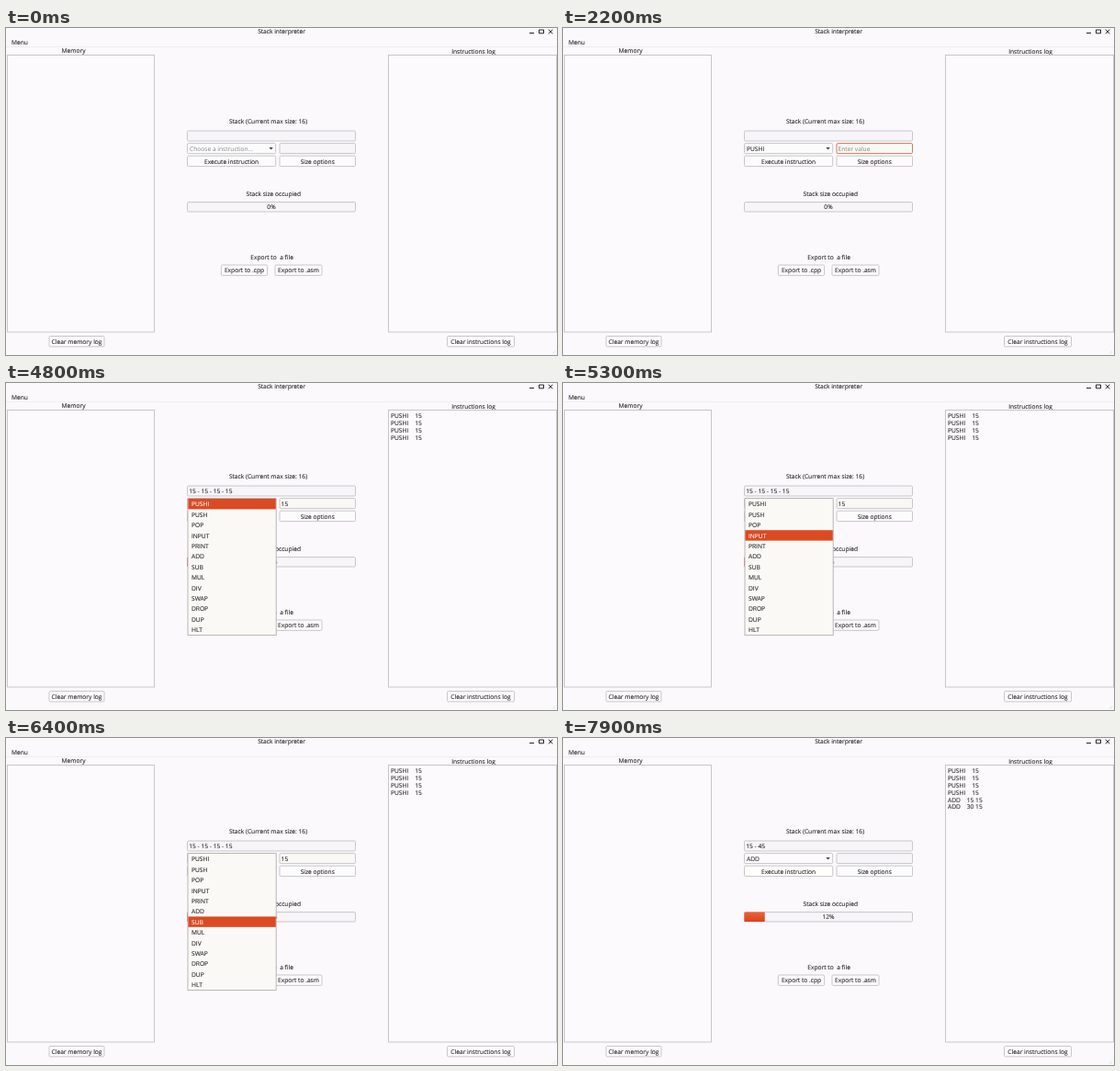
An HTML page that plays this animation: 600x356 px, repeating every 8000 ms.

```html
<!DOCTYPE html>
<html lang="en">
<head>
<meta charset="utf-8">
<title>Stack interpreter</title>
<style>
  html, body { margin: 0; width: 100%; height: 100%; overflow: hidden; background: #fbf9fc; }
  svg { display: block; width: 600px; height: 356px; }
  text {
    font: 6.65px "Open Sans", "Noto Sans", sans-serif;
    fill: #262426; stroke: #262426; stroke-width: .1px;
    text-rendering: geometricPrecision; white-space: pre;
  }
  .mid { text-anchor: middle; }
  .hint { fill: #858386; stroke: none; }
  .lit { fill: #fff; stroke: #fff; }
  .box { fill: #fcfafd; stroke: #c3c1c4; stroke-width: .9px; }
  .field { fill: #f7f5f8; }
  .field.on { fill: #faf8f4; }
  .field.focus { stroke: #cf6a48; }
  .button { fill: #fdfcfd; }
  .hover { fill: #fffffc; }
  .list { fill: #fbf9f6; stroke: #b3b0ae; }
  .mark { fill: none; stroke: #262426; stroke-width: 1px; }
</style>
</head>
<body>
<svg id="stage" viewBox="0 0 600 356">
  <defs>
    <linearGradient id="heat" x2="0" y2="1">
      <stop offset="0" stop-color="#ee6139"/>
      <stop offset="1" stop-color="#d8431d"/>
    </linearGradient>
  </defs>
</svg>
<script>
const stage = document.getElementById('stage');
const LOOP = 8000;
const CODES = 'PUSHI PUSH POP INPUT PRINT ADD SUB MUL DIV SWAP DROP DUP HLT'.split(' ');
const ROW = 11.4;
const GAP = '\u00a0'.repeat(4);

function add(tag, attrs, parent = stage) {
  const el = document.createElementNS('http://www.w3.org/2000/svg', tag);
  for (const key in attrs) el.setAttribute(key, attrs[key]);
  return parent.appendChild(el);
}

function box(x, y, right, bottom, cls = '', parent = stage, rx = 1.2) {
  return add('rect', { x, y, width: right - x, height: bottom - y, rx, class: 'box ' + cls }, parent);
}

// y is the middle of the capitals
function label(str, x, y, cls = '', parent = stage) {
  const el = add('text', { x, y: y + 2.4, class: cls }, parent);
  el.textContent = str;
  return el;
}

function button(str, x, y, right) {
  const el = box(x, y, right, y + 11.4, 'button');
  label(str, (x + right) / 2, y + 5.9, 'mid');
  return el;
}

const show = (el, on) => el.setAttribute('visibility', on ? 'visible' : 'hidden');
const write = (el, str) => { if (el.textContent !== str) el.textContent = str; };

// window frame
label('Stack interpreter', 300, 3.6, 'mid');
add('path', { d: 'M570 5.5h5M580.5 2h5v3.8h-5zM590.7 1.6l4.6 4.6m0-4.6l-4.6 4.6', class: 'mark' });
label('Menu', 6, 15.5);
add('path', { d: 'M0 20.5H600', stroke: '#f0eef1' });
add('path', { d: 'M595 354.5l3-3m-1 3l1-1', stroke: '#cfcdd0', 'stroke-width': .6 });

// side panels
label('Memory', 73.5, 25, 'mid');
box(1.5, 29.5, 161.5, 331, '', stage, 0);
button('Clear memory log', 47, 335.5, 107);
label('Instructions log', 509, 25.5, 'mid');
box(416.5, 29.5, 599.6, 331, '', stage, 0);
button('Clear instructions log', 480.5, 335.5, 553.5);
const logRows = Array.from({ length: 6 }, (_, i) => label('', 419, 36 + i * 7.8));

// centre column
label('Stack (Current max size: 16)', 285.5, 102, 'mid');
box(197.5, 112, 380.5, 123, 'field');
const stackText = label('', 199.3, 117.7);

box(197.5, 125.6, 293.7, 136.6, 'button');
const choice = label('', 200, 131.2);
add('path', { d: 'M286.4 130h4.4l-2.2 2.5z', fill: '#444' });

const field = box(298, 125.6, 380.5, 136.6, 'field');
const fieldText = label('', 299.6, 131.2);
const caret = add('path', { stroke: '#262426', 'stroke-width': .7 });

const execute = button('Execute instruction', 197.5, 139.2, 293.7);
button('Size options', 298, 139.2, 380.5);

label('Stack size occupied', 291.3, 181, 'mid');
box(197.5, 189.6, 380.5, 200, 'field');
const bar = add('rect', { x: 197.4, y: 189.5, height: 10.6, rx: 1.2, fill: 'url(#heat)' });
const percent = label('', 289, 195, 'mid');

label('Export to\u00a0 a file', 289.6, 249.3, 'mid');
button('Export to .cpp', 234.4, 258, 284.6);
button('Export to .asm', 293, 258, 344);

// drop-down list
const popup = add('g');
box(198, 125.6, 294.2, 274.6, 'list', popup, 0);
const glow = add('rect', { x: 198.4, width: 95.4, height: ROW, fill: '#dc4a22' }, popup);
const items = CODES.map((code, i) => label(code, 202, 132 + i * ROW, '', popup));

// [time, value]: each value holds until the next one
const HOVER = [
  [0, null], [500, ''], [600, 'PUSH'], [800, 'PUSHI'], [1200, null],
  [4800, 'PUSHI'], [5000, 'PUSH'], [5100, 'POP'], [5300, 'INPUT'], [5500, 'PRINT'],
  [5700, 'INPUT'], [6100, 'POP'], [6300, 'PRINT'], [6400, 'SUB'], [6500, 'MUL'],
  [6600, 'SUB'], [6900, 'ADD'], [7200, null]
];
const CHOICE = [[0, ''], [1200, 'PUSHI'], [7200, 'ADD']];
const INPUT = [[0, ''], [1200, 'Enter value'], [2400, '15'], [7200, '']];
const RUNS = [
  [3400, 'PUSHI'], [3600, 'PUSHI'], [3700, 'PUSHI'], [3900, 'PUSHI'],
  [7700, 'ADD'], [7900, 'ADD']
];

const at = (track, t) => track.filter(([start]) => start <= t).pop()[1];
const within = (t, from, to) => t >= from && t < to;

function run(t) {
  const stack = [], log = [];
  for (const [start, code] of RUNS) {
    if (start > t) break;
    if (code === 'PUSHI') {
      stack.push(15);
      log.push(code + GAP + 15);
    } else {
      const a = stack.pop(), b = stack.pop();
      stack.push(a + b);
      log.push(code + GAP + a + ' ' + b);
    }
  }
  return { stack, log };
}

function draw(t) {
  const { stack, log } = run(t);
  logRows.forEach((row, i) => write(row, log[i] || ''));
  write(stackText, stack.join(' - '));
  const used = Math.floor(stack.length / 16 * 100);
  write(percent, used + '%');
  bar.setAttribute('width', used ? 183 * used / 100 + .4 : 0);

  const code = at(CHOICE, t);
  write(choice, code || 'Choose a instruction...');
  choice.setAttribute('class', code ? '' : 'hint');

  const typed = t >= 2400;
  write(fieldText, at(INPUT, t));
  fieldText.setAttribute('class', typed ? '' : 'hint');
  field.setAttribute('class', 'box field' +
    (within(t, 1200, 7200) ? ' on' : '') + (within(t, 1600, 3400) ? ' focus' : ''));
  caret.setAttribute('d', `M${typed ? 307.3 : 299.5} 127.2v7.8`);
  show(caret, within(t, 1600, 2200) || within(t, 2400, 3200));
  execute.setAttribute('class', 'box button' +
    (within(t, 3400, 4800) || t >= 7700 ? ' hover' : ''));

  const hover = at(HOVER, t);
  const row = CODES.indexOf(hover);
  popup.setAttribute('display', hover === null ? 'none' : 'inline');
  glow.setAttribute('y', 126 + row * ROW);
  glow.setAttribute('display', row < 0 ? 'none' : 'inline');
  items.forEach((item, i) => item.setAttribute('class', i === row ? 'lit' : ''));
}

const begin = performance.now();
function tick() {
  draw((performance.now() - begin) % LOOP);
  requestAnimationFrame(tick);
}
tick();
</script>
</body>
</html>
```
